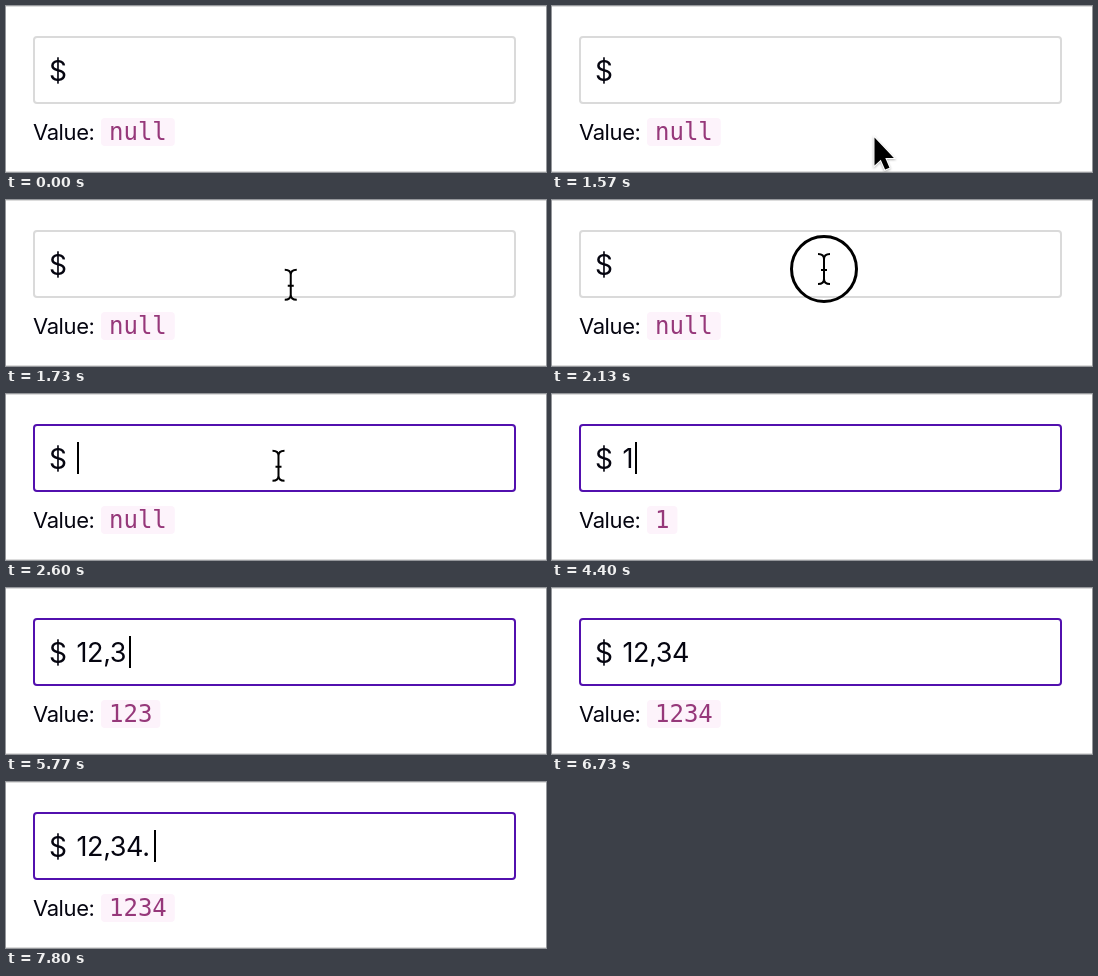
Write an HTML page that moves like this. It is 540 by 166 pixels and loops after 8000 ms.

```html
<!DOCTYPE html>
<html lang="en">
<head>
<meta charset="utf-8">
<title>Currency input</title>
<style>
  html, body { margin: 0; width: 100%; height: 100%; overflow: hidden; background: #fff; }
  svg { display: block; width: 540px; height: 166px; }
  text { white-space: pre; }
  .ui { font-family: Inter, "Open Sans", sans-serif; fill: #050510; }
  .amount { font-size: 27px; letter-spacing: -.4px; }
  .label { font-size: 22px; letter-spacing: -.4px; }
  .code { font: 24px "DejaVu Sans Mono", monospace; fill: #96387a; }
  .field { fill: #fff; stroke: #dadada; stroke-width: 2; }
  .field.focus { stroke: #5210ae; }
  .rule { fill: #dcdcdc; }
  .arrow { filter: drop-shadow(0 1px 1px rgba(0, 0, 0, .3)); }
</style>
</head>
<body>
<svg viewBox="0 0 540 166">
  <rect class="rule" width="540" height="1"/>
  <rect class="rule" y="165" width="540" height="1"/>

  <rect id="field" class="field" x="28" y="31" width="481" height="66" rx="3"/>
  <text class="ui" x="43" y="75" font-size="28">$</text>
  <text id="amount" class="ui amount" x="70.5" y="74"></text>
  <rect id="caret" y="48" width="2" height="32"/>

  <text class="ui label" x="27" y="134">Value:</text>
  <rect id="badge" x="95" y="112" height="28" rx="4" fill="#fdf3fb"/>
  <text id="value" class="code" x="103" y="134"></text>

  <circle id="ring" cx="272" cy="69" r="32.5" fill="none" stroke="#000" stroke-width="3"/>
  <g id="pointer">
    <path id="arrow" class="arrow" d="M0 0V28L6.3 22.2L10.6 32L15 30.2L10.8 20.4H19.4Z"
      stroke="#fff" stroke-width="2" paint-order="stroke"/>
    <path id="beam" d="M-6 -15Q0 -15 0 -10Q0 -15 6 -15M0 -10V10M-6 15Q0 15 0 10Q0 15 6 15M-3 1H3"
      fill="none" stroke="#000" stroke-width="2"/>
  </g>
</svg>
<script>
  const LOOP = 8000;
  const STEP = 1000 / 30;
  const $ = id => document.getElementById(id);
  const show = (id, on) => $(id).setAttribute("visibility", on ? "visible" : "hidden");

  // [time, typed text, caret visible]
  const states = [
    [0, "", false],
    [2170, "", true], [2670, "", false],
    [3170, "", true], [3670, "", false],
    [4170, "", true],
    [4400, "1", true],
    [4700, "12", true],
    [5070, "12,", true], [5570, "12,", false],
    [5770, "12,3", true],
    [6200, "12,34", true], [6730, "12,34", false],
    [6800, "12,34.", true], [7330, "12,34.", false],
    [7800, "12,34.", true]
  ];
  const caretX = [71, 83, 99, 107, 123, 141, 148];
  const rest = { x: 272, y: 69 };

  const glide = (from, to, p) => ({
    x: from.x + (to.x - from.x) * p,
    y: from.y + (to.y - from.y) * p
  });

  function pointerAt(t) {
    if (t < 1495 || t >= 2870) return null;
    const tick = Math.floor((t + 4) / STEP) * STEP;
    if (tick < 1866) {
      const left = 1 - Math.max(0, tick - 1500) / 367;
      return glide(rest, { x: 343, y: 157 }, left ** 1.7);
    }
    const out = Math.max(0, tick - 2567) / 300;
    return glide(rest, { x: 289, y: 164 }, out ** 1.6);
  }

  function drawPointer(t) {
    const p = pointerAt(t);
    const overField = p && p.y < 98;
    if (p) $("pointer").setAttribute("transform", `translate(${p.x} ${p.y})`);
    show("arrow", p && !overField);
    show("beam", overField);
    show("ring", t >= 2130 && t < 2270);
  }

  function drawInput(t) {
    const [, text, caretOn] = states.filter(s => s[0] <= t).pop();
    const value = text.replace(/\D/g, "") || "null";
    $("amount").textContent = text;
    $("value").textContent = value;
    $("badge").setAttribute("width", 16 + value.length * 14.45);
    $("caret").setAttribute("x", caretX[text.length]);
    show("caret", caretOn);
    $("field").classList.toggle("focus", t >= 2170);
  }

  function render() {
    const t = performance.now() % LOOP;
    drawInput(t);
    drawPointer(t);
    requestAnimationFrame(render);
  }
  render();
</script>
</body>
</html>
```
